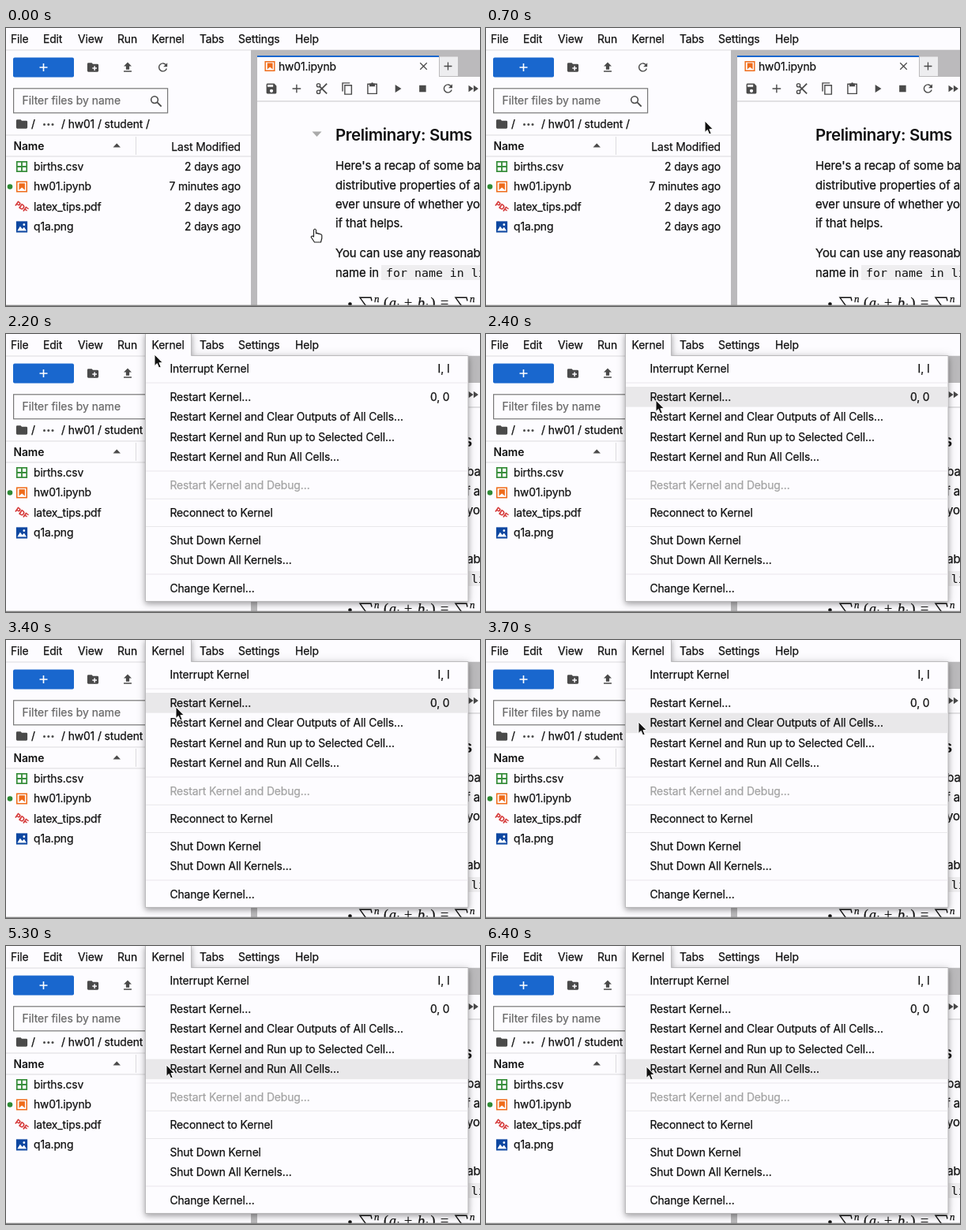
Recreate the animation shown at these times as an HTML page. Size 600x353 px, loop 6.8 s.

```html
<!DOCTYPE html>
<html lang="en">
<head>
<meta charset="utf-8">
<title>Kernel menu</title>
<style>
  html, body { margin: 0; width: 100%; height: 100%; overflow: hidden; background: #fdfcff; }
  svg { display: block; width: 100%; height: 100%; }
  text {
    font: 13.87px Inter, "Open Sans", sans-serif; letter-spacing: -.11px; white-space: pre;
    color: #111; fill: currentColor; stroke: currentColor; stroke-width: .25px;
  }
  .end { text-anchor: end; }
  .bold { font-weight: 600; stroke: none; }
  .muted { color: #6a6a6a; letter-spacing: .03px; }
  .off { color: #a3a3a3; }
  .body { font-size: 14.93px; letter-spacing: -.1px; }
  .title { font-size: 20.5px; font-weight: 600; letter-spacing: -.4px; stroke: none; }
  .code { font: 14.93px "DejaVu Sans Mono", monospace; letter-spacing: 0; stroke: none; }
  .math { font: italic 18px "Liberation Serif", serif; letter-spacing: 0; }
  .up { font-style: normal; }
  .small { font-size: 13px; }
  .pdf { font-size: 9px; font-weight: 700; letter-spacing: 0; color: #d32f2f; text-anchor: middle; }
  #menuBox { filter: drop-shadow(0 3px 3px rgba(0, 0, 0, .25)) drop-shadow(0 1px 6px rgba(0, 0, 0, .16)); }
</style>
</head>
<body>
<svg id="stage" viewBox="0 0 600 353" preserveAspectRatio="none"></svg>
<script>
const LOOP = 6800, STEP = 100, MENU_OPENS = 1500;
const INK = '#4a4a4a', PAPER = '#fdfcff', STRIP = '#bbbabc', LINE = '#dcdbde';

// Pointer tip: time, x, y
const PATH = [
  [0, 391, 255], [100, 364, 235], [200, 338, 213], [300, 338, 213],
  [400, 334, 206], [600, 304, 156], [800, 250, 80], [900, 230, 50], [1000, 221, 37],
  [1100, 213, 21], [1200, 208, 13], [1300, 206, 12], [1400, 206, 11], [1800, 206, 11],
  [1900, 204, 12], [2000, 198, 15], [2100, 191, 21], [2200, 188, 26],
  [2300, 200, 59], [2400, 215, 84], [2500, 215, 85], [3500, 215, 85],
  [3600, 204, 93], [3700, 193, 104], [3800, 193, 109], [3900, 194, 116],
  [4000, 195, 126], [4100, 197, 134], [4200, 198, 137], [5000, 198, 137],
  [5100, 199, 140], [5200, 201, 146], [5300, 203, 151], [5400, 203, 153], [LOOP, 203, 153]
];

const MENU_BAR = [['File', 6], ['Edit', 47], ['View', 91], ['Run', 141],
  ['Kernel', 184.5], ['Tabs', 245], ['Settings', 294], ['Help', 366]];

const MENU = [
  ['Interrupt Kernel', 44.3, 'I, I'], ['Restart Kernel…', 79.8, '0, 0'],
  ['Restart Kernel and Clear Outputs of All Cells…', 105.4],
  ['Restart Kernel and Run up to Selected Cell…', 131],
  ['Restart Kernel and Run All Cells…', 156.4],
  ['Restart Kernel and Debug…', 191.6], ['Reconnect to Kernel', 227],
  ['Shut Down Kernel', 261.8], ['Shut Down All Kernels…', 287.3], ['Change Kernel…', 322.5]
];
const DISABLED = 5, ROW = 25.6;
const SEPARATORS = [62, 174, 209.3, 244.5, 305];

const FILES = [['births.csv', 176, '2 days ago'], ['hw01.ipynb', 201.5, '7 minutes ago'],
  ['latex_tips.pdf', 227, '2 days ago'], ['q1a.png', 252.5, '2 days ago']];

// Icons on a 24-unit grid
const fill = (d, color = INK) => `<path d="${d}" fill="${color}" fill-rule="evenodd"/>`;
const stroke = (d, color = INK, w = 2) => `<path d="${d}" fill="none" stroke="${color}" stroke-width="${w}"/>`;
const circle = (x, y, r, color) => `<circle cx="${x}" cy="${y}" r="${r}" fill="${color}"/>`;
const folder = fill('M10 4H4q-2 0-2 2v12q0 2 2 2h16q2 0 2-2V8q0-2-2-2h-8z');
const ICONS = {
  folder,
  newFolder: folder + stroke('M15 9.5v8M11 13.5h8', PAPER),
  upload: fill('M5 20h14v-2H5zM5 10h4v6h6v-6h4l-7-7z'),
  refresh: stroke('M18.3 8.5A7 7 0 1 0 18.8 14') + fill('M13 11h7V4z'),
  search: stroke('M3.9 9.5a5.6 5.6 0 1 0 11.2 0a5.6 5.6 0 1 0-11.2 0') + stroke('M13.8 13.8L20.5 20.5', INK, 2.4),
  save: fill('M17 3H5q-2 0-2 2v14q0 2 2 2h14q2 0 2-2V7zM12 19a3 3 0 1 1 0-6a3 3 0 1 1 0 6zM15 9H5V5h10z'),
  plus: stroke('M12 4.5v15M4.5 12h15'),
  cut: stroke('M3 6a3 3 0 1 0 6 0a3 3 0 1 0-6 0M3 18a3 3 0 1 0 6 0a3 3 0 1 0-6 0') + stroke('M8 8L21 21M8 16L21 3', INK, 2.5),
  copy: stroke('M8 6h12v16H8zM4 17V2h13'),
  paste: stroke('M4 4h16v17H4z') + fill('M7 3h3a2 2 0 0 1 4 0h3v5H7z'),
  play: fill('M8 5v14l11-7z'),
  stop: fill('M6 6h12v12H6z'),
  forward: fill('M4 18l8.5-6L4 6zM13 6v12l8.5-6z'),
  close: stroke('M6 6L18 18M18 6L6 18', INK, 1.8),
  table: fill('M2 2h20v20H2zM4.5 4.5v6.2h6.2V4.5zM13.3 4.5v6.2h6.2V4.5zM4.5 13.3v6.2h6.2v-6.2zM13.3 13.3v6.2h6.2v-6.2z', '#388e3c'),
  notebook: stroke('M3.2 3.2h17.6v17.6H3.2z', '#ef6c1a', 2.2) + fill('M7 6h10.5v12L12.2 13.5L7 18z', '#ef6c1a'),
  image: fill('M2 2h20v20H2z', '#0d47a1') + fill('M4 19l5-8 4 5 3-3.5 4.5 6.5zM16 6a2 2 0 1 1 0 4a2 2 0 1 1 0-4', '#fff')
};

const icon = (name, x, y, scale = .71) =>
  `<g transform="translate(${x} ${y}) scale(${scale}) translate(-12 -12)">${ICONS[name]}</g>`;
const rect = (x, y, w, h, color, extra = '') =>
  `<rect x="${x}" y="${y}" width="${w}" height="${h}" fill="${color}" ${extra}/>`;
const text = (s, x, y, cls = '') => `<text x="${x}" y="${y}" class="${cls}">${s}</text>`;

function menuBar() {
  return rect(0, 27.5, 600, 1, LINE) +
    rect(176, 0, 59, 28, '#ececee', 'id="hover"') +
    MENU_BAR.map(([label, x]) => text(label, x, 19.2)).join('');
}

function sidebar() {
  const fileIcons = ['table', 'notebook', null, 'image'];
  const rows = FILES.map(([name, y, age], i) =>
    (fileIcons[i] ? icon(fileIcons[i], 20, y) : '') +
    text(name, 35, y + 4.9) + text(age, 297, y + 4.9, 'end')).join('');
  return rect(9, 37.6, 77, 25, '#1967ce', 'rx="2"') + stroke('M47.5 45v10M42.5 50h10', '#fff', 1.6) +
    icon('newFolder', 110, 50) + icon('upload', 154, 50) + icon('refresh', 198.5, 50) +
    rect(9.6, 76.8, 195, 31, PAPER, 'stroke="#777" stroke-width="1.2"') +
    text('Filter files by name', 20.5, 97.1, 'muted') + icon('search', 190, 93, .78) +
    icon('folder', 20, 122) + text('/', 32, 126.5) +
    [48.5, 53.8, 59].map(x => circle(x, 122.5, 1.5, INK)).join('') +
    text('/ hw01 / student /', 70, 126.5) +
    rect(0, 135.5, 310, 1, LINE) + rect(0, 162.5, 310, 1, LINE) + rect(164, 138, 1, 23, LINE) +
    text('Name', 9.5, 154.5, 'bold') + fill('M135.5 151.5h9.5l-4.75-5z') +
    text('Last Modified', 297, 155.8, 'end') + rows +
    circle(5, 201.5, 3.3, '#2e8b35') +
    '<g transform="translate(20 227) rotate(35)"><text class="pdf" y="3.3">PDF</text></g>';
}

function notebook() {
  const tools = ['save', 'plus', 'cut', 'copy', 'paste', 'play', 'stop', 'refresh', 'forward'];
  const sigma = x => stroke(`M${x + 16} 346.5L${x + 15} 342.3H${x + 1}L${x + 8} 352L${x + 1} 361`, '#111', 1.4) +
    text('n', x + 19, 347.5, 'math small') + text('i=1', x + 18, 361, 'math small');
  const formula = [['(', 478, 'up'], ['a', 485], ['+', 504, 'up'], ['b', 521], [')', 537.5, 'up'], ['=', 550, 'up']];
  const lines = [['Here\'s a recap of some basic', 180.3], ['distributive properties of addition', 204.6],
    ['ever unsure of whether your', 228.8], ['if that helps.', 253], ['You can use any reasonable', 291.3], ['name in', 315.5]];
  return rect(310, 28, 290, 34, STRIP) + rect(310, 28, 8, 325, STRIP) +
    rect(318, 35, 230, 28, PAPER) + rect(318, 35, 230, 2, '#1967ce') +
    rect(548.5, 36, 24, 25.5, '#ededef', `stroke="${STRIP}"`) +
    icon('notebook', 334, 48.5, .66) + text('hw01.ipynb', 345, 53.5) +
    icon('close', 528.5, 48.5) + icon('plus', 559.5, 48.5, .66) +
    tools.map((name, i) => icon(name, 336 + i * 31.9, 77)).join('') +
    rect(318, 92.5, 282, 1, '#c6c5c7') +
    `<g id="collapser">${fill('M387.5 131.5h12l-6 6.5z', '#aaa')}</g>` +
    text('Preliminary: Sums', 417, 143.3, 'title') +
    lines.map(([s, y]) => text(s, 417, y, 'body')).join('') +
    rect(475, 301, 125, 19, '#efeef0') + text('for name in list', 481, 315.5, 'code') +
    circle(435.5, 350.5, 2.3, '#111') + sigma(447) + sigma(568) +
    formula.map(([s, x, cls = '']) => text(s, x, 354.5, 'math ' + cls)).join('') +
    [494, 530.5].map(x => text('i', x, 357.5, 'math small')).join('');
}

function menu() {
  const items = MENU.map(([label, y, keys], i) =>
    text(label, 207.5, y + 5, i === DISABLED ? 'off' : '') +
    (keys ? text(keys, 561.5, y + 5, 'end') : '')).join('');
  return `<g id="menu">
    <path id="menuBox" d="M176.5 -1H234.5V27.5H585V339.5H176.5Z" fill="${PAPER}" stroke="${STRIP}"/>
    ${text('Kernel', 184.5, 19.2)}
    ${rect(177, 0, 407.5, ROW, '#e9e8ea', 'id="highlight"')}
    ${SEPARATORS.map(y => rect(177, y - .5, 407.5, 1, '#e9e8eb')).join('')}${items}</g>`;
}

const pointer = `<g id="pointer">
  <path id="arrow" d="M0 0V14.5L3.3 11.5L5.6 17L8.2 15.9L5.9 10.6H10.3Z" fill="#111" stroke="#fff" stroke-width="1"/>
  <path id="hand" d="M-1.5 10V1.5q1.5-2.5 3 0V6q1.5-1.3 2.6.4q1.6-.8 2.5.6q2-.5 2.2 1.5V12l-1.3 5H-.5L-4.8 10.5q.6-2.3 3.3-.5z"
    fill="#fff" stroke="#222" stroke-width="1.2" stroke-linejoin="round"/></g>`;

const stage = document.getElementById('stage');
const bottomEdge = rect(0, 351.7, 600, 1.3, '#858585');
stage.innerHTML = menuBar() + sidebar() + notebook() + bottomEdge + menu() + pointer;
const part = id => document.getElementById(id);
const show = (id, on) => part(id).setAttribute('visibility', on ? 'visible' : 'hidden');

function pointerAt(t) {
  const i = PATH.findIndex(p => p[0] > t);
  const [t0, x0, y0] = PATH[i - 1], [t1, x1, y1] = PATH[i];
  const k = (t - t0) / (t1 - t0);
  return [x0 + (x1 - x0) * k, y0 + (y1 - y0) * k];
}

function draw(now) {
  const t = Math.floor(now % LOOP / STEP) * STEP;
  const [x, y] = pointerAt(t);
  const open = t >= MENU_OPENS;
  const row = MENU.find(([, mid]) => Math.abs(y - mid) < ROW / 2);
  part('pointer').setAttribute('transform', `translate(${x} ${y})`);
  show('hand', x > 380);
  show('arrow', x <= 380);
  show('collapser', !open && x > 318 && y > 93);
  show('hover', !open && y < 28);
  show('menu', open);
  show('highlight', open && row);
  if (row) part('highlight').setAttribute('y', row[1] - ROW / 2);
}

const start = performance.now();
function tick() {
  draw(performance.now() - start);
  requestAnimationFrame(tick);
}
tick();
</script>
</body>
</html>
```
